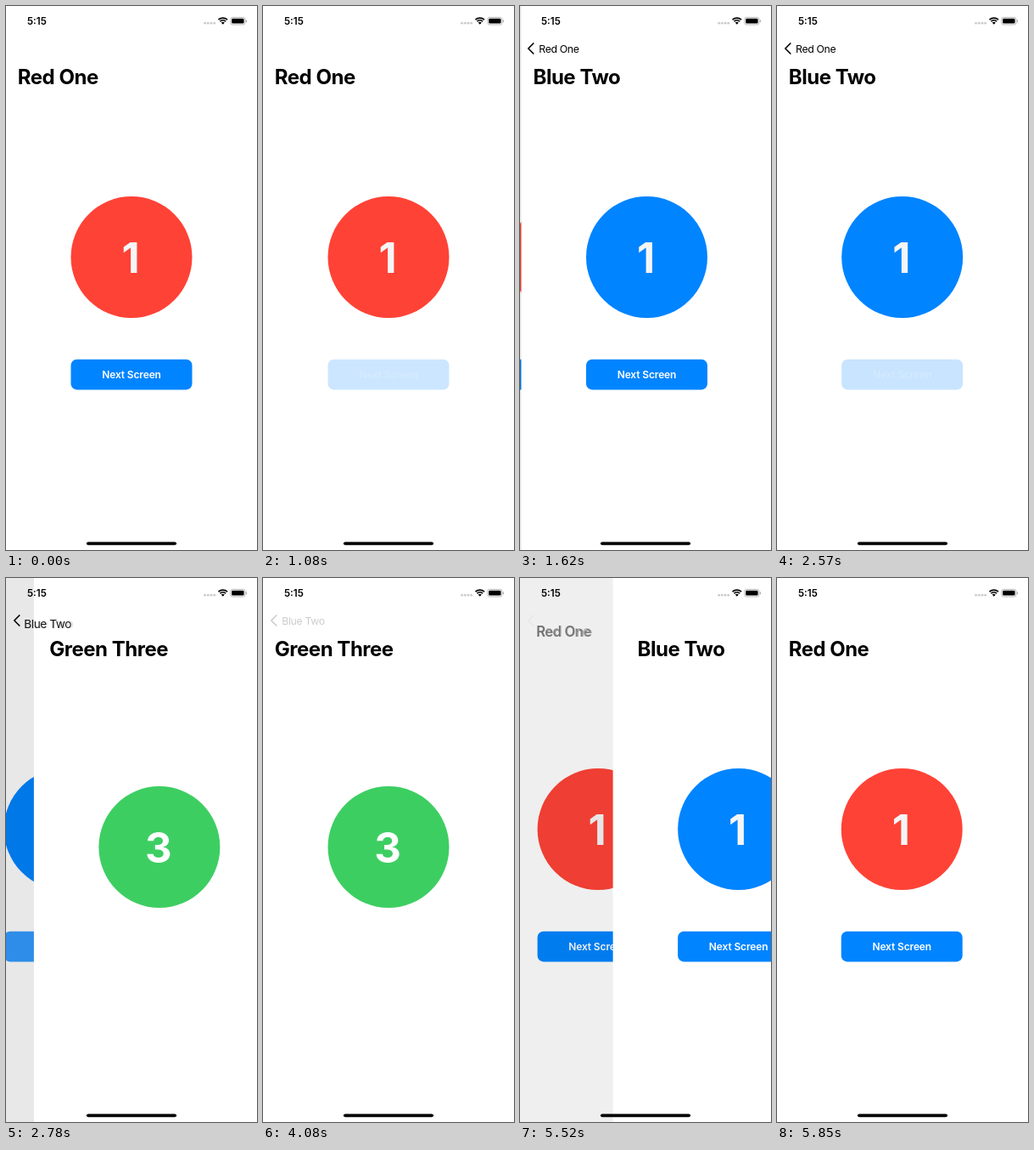
Animation of 296 by 640 pixels, one loop 5.95 s. Source, as an HTML page with a canvas:

```html
<!DOCTYPE html>
<html lang="en">
<head>
<meta charset="utf-8">
<title>Navigation demo</title>
<style>
html, body { margin: 0; width: 100%; height: 100%; overflow: hidden; background: #fff; }
canvas { display: block; width: 296px; height: 640px; }
</style>
</head>
<body>
<canvas id="stage"></canvas>
<script>
const W = 296, H = 640, LOOP = 5950, STEPS = 5;
const canvas = document.getElementById('stage');
const ctx = canvas.getContext('2d');
const dpr = window.devicePixelRatio || 1;
canvas.width = W * dpr;
canvas.height = H * dpr;

const BLUE = '#0084ff';
const screens = [
  { title: 'Red One', color: '#ff4236', digit: '1', ink: '#f5f5f5', y: 295.5, button: true },
  { title: 'Blue Two', color: BLUE, digit: '1', ink: '#f5f5f5', y: 295.5, button: true },
  { title: 'Green Three', color: '#3dce62', digit: '3', ink: '#fff', y: 316.5, button: false },
];

// hold: time between touching a control and the slide starting
const moves = [
  { start: 1080, length: 540, under: 0, push: true, hold: 103 },
  { start: 2460, length: 540, under: 1, push: true, hold: 103 },
  { start: 4080, length: 560, under: 1, push: false, hold: 140 },
  { start: 5310, length: 540, under: 0, push: false, hold: 140 },
];

const clamp = v => Math.max(0, Math.min(1, v));
const mix = (a, b, p) => a + (b - a) * p;
// Critically damped spring: distance left after ms
const spring = ms => ms <= 0 ? 1 : (1 + 0.017 * ms) * Math.exp(-0.017 * ms);

function text(str, x, y, size, weight, color, { align = 'left', track = 0, alpha = 1 } = {}) {
  ctx.globalAlpha = alpha;
  ctx.font = `${weight} ${size}px Inter, sans-serif`;
  ctx.letterSpacing = track * size + 'px';
  ctx.textAlign = align;
  ctx.fillStyle = color;
  ctx.fillText(str, x, y);
  ctx.globalAlpha = 1;
}

function box(x, y, w, h, r, color) {
  ctx.fillStyle = color;
  ctx.beginPath();
  ctx.roundRect(x, y, w, h, r);
  ctx.fill();
}

function disc(x, y, r, color) {
  ctx.fillStyle = color;
  ctx.beginPath();
  ctx.arc(x, y, r, 0, 7);
  ctx.fill();
}

function drawScreen(s, x, buttonAlpha) {
  ctx.save();
  ctx.translate(x, 0);
  ctx.fillStyle = '#fff';
  ctx.fillRect(0, 0, W, H);
  disc(148, s.y, 71.5, s.color);
  text(s.digit, 147, s.y + 18.3, 49, 700, s.ink, { align: 'center' });
  if (s.button) {
    ctx.globalAlpha = buttonAlpha;
    box(76.5, 415.7, 143, 35.7, 7, BLUE);
    text('Next Screen', 148, 438, 12, 600, '#fff',
      { align: 'center', track: -0.011, alpha: buttonAlpha });
  }
  ctx.restore();
}

function drawChevron(alpha) {
  ctx.globalAlpha = alpha;
  ctx.strokeStyle = '#000';
  ctx.lineWidth = 1.7;
  ctx.lineCap = ctx.lineJoin = 'round';
  ctx.beginPath();
  ctx.moveTo(15.8, 44);
  ctx.lineTo(9.8, 50);
  ctx.lineTo(15.8, 56);
  ctx.stroke();
  ctx.globalAlpha = 1;
}

function drawNavBar(under, p, backAlpha) {
  const a = screens[under], b = screens[under + 1], before = screens[under - 1];
  const label = { track: -0.03 }, heading = { track: -0.02 };
  if (before)
    text(before.title, 22.3 - 60 * p, 54.8, 12.3, 400, '#000', { ...label, alpha: clamp(1 - 2.5 * p) });
  drawChevron(backAlpha * (before ? 1 : clamp((p - 0.6) * 3)));

  // The large title shrinks into the back label
  const x = mix(13.8, 22.3, p), y = mix(92.4, 54.8, p), size = mix(24, 12.3, p);
  text(a.title, x, y, size, 700, '#000', { ...heading, alpha: 1 - p });
  text(a.title, x, y, size, 400, '#000', { ...label, alpha: p * backAlpha });
  text(b.title, 13.8 + 337 * (1 - p), 92.4, 24, 700, '#000', heading);
}

function drawStatus() {
  text('5:15', 25, 22, 11.6, 600, '#000');
  for (let i = 0; i < 4; i++) disc(234.6 + i * 3.7, 20.2, 1.4, '#cbcbcb');

  ctx.strokeStyle = '#000';
  ctx.lineCap = 'butt';
  for (const [r, w] of [[7.7, 1.8], [4.9, 1.7], [1.5, 3]]) {
    ctx.lineWidth = w;
    ctx.beginPath();
    ctx.arc(255.8, 21.8, r, -Math.PI * 0.74, -Math.PI * 0.26);
    ctx.stroke();
  }

  ctx.strokeStyle = '#a6a6a6';
  ctx.lineWidth = 0.8;
  ctx.beginPath();
  ctx.roundRect(264.8, 13.4, 17.2, 8.6, 2.4);
  ctx.stroke();
  box(266.2, 14.8, 14.4, 5.8, 1.3, '#000');
  box(282.8, 16.2, 1.1, 3, 0.5, '#a6a6a6');

  box(95, 630.4, 106, 3.9, 2, '#000');
}

function draw(under, p, buttonAlpha, backAlpha) {
  ctx.setTransform(dpr, 0, 0, dpr, 0, 0);
  drawScreen(screens[under], -0.3 * W * p, buttonAlpha);
  ctx.fillStyle = `rgba(0, 0, 0, ${0.1 * p})`;
  ctx.fillRect(0, 0, W, H);
  drawScreen(screens[under + 1], W * (1 - p), 1);
  drawNavBar(under, p, backAlpha);
  drawStatus();
}

function render(t) {
  const move = moves.findLast(m => t >= m.start);
  if (!move) return draw(0, 0, 1, 1);
  // Slides advance in discrete steps and rest on the last one
  const step = move.length / STEPS;
  const slide = Math.min(STEPS, Math.floor((t - move.start + 8) / step)) * step - move.hold;
  const left = spring(slide);
  const press = mix(0.2, 1, clamp(slide / 290));
  if (move.push) draw(move.under, 1 - left, press, 1);
  else draw(move.under, left, 1, press);
}

const begin = performance.now();
function tick() {
  render((performance.now() - begin) % LOOP);
  requestAnimationFrame(tick);
}
tick();
</script>
</body>
</html>
```
